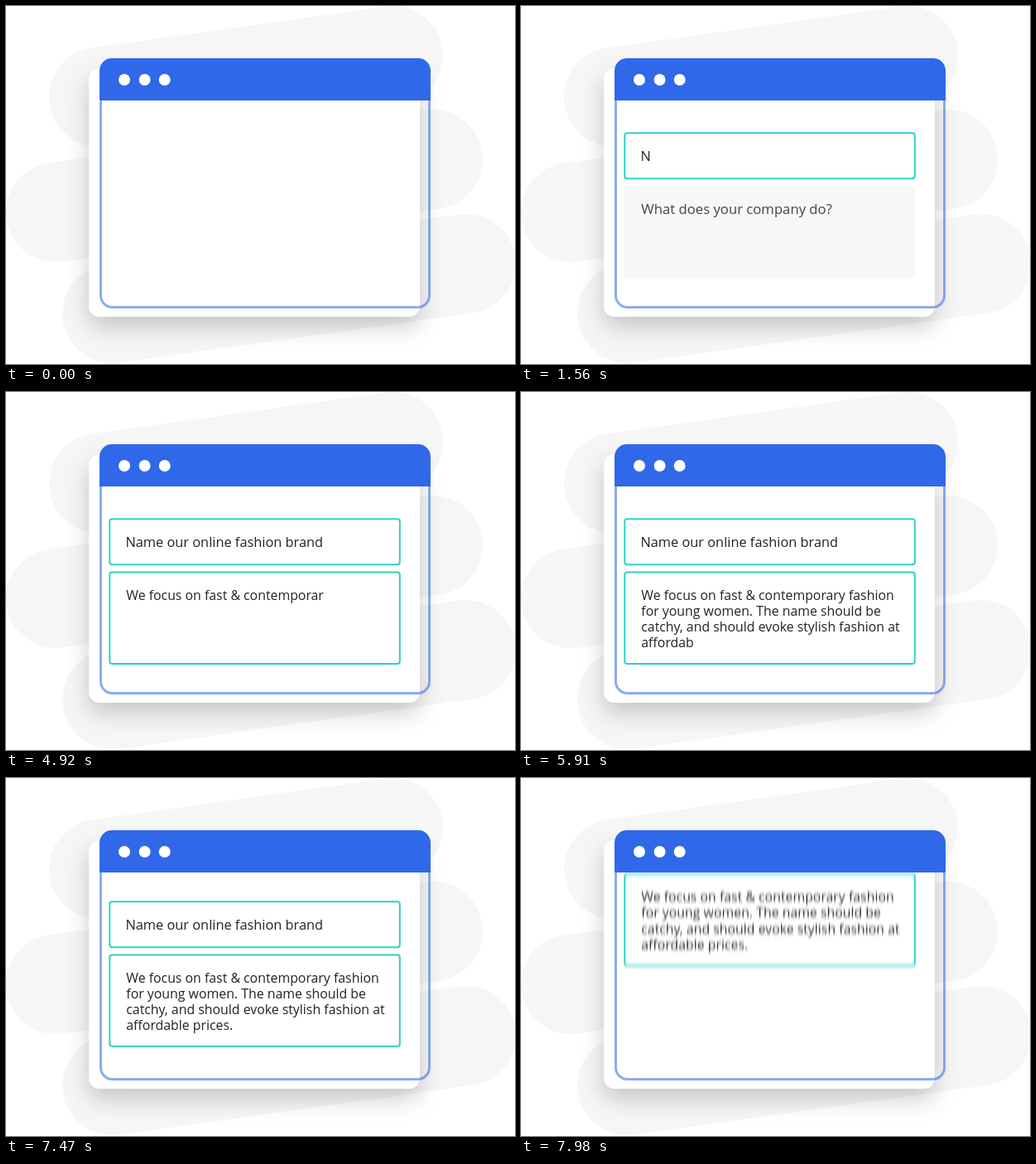
Write an HTML page that moves like this. It is 615x432 px and loops after 8 s.

```html
<!DOCTYPE html>
<html lang="en">
<head>
<meta charset="utf-8">
<title>Naming brief form</title>
<style>
  html, body { margin: 0; width: 100%; height: 100%; overflow: hidden; background: #fff; }
  svg { display: block; width: 615px; height: 432px; }
  text { font-family: "Open Sans", "Noto Sans", sans-serif; white-space: pre; }
  .blobs { stroke: #f6f6f6; stroke-width: 120; stroke-linecap: round; }
  .card { filter: drop-shadow(0 12px 14px rgba(0, 0, 0, .2)); }
  .fill { fill: #f7f7f7; }
  .edge { fill: #fff; stroke: #2fd0cb; stroke-width: 2; }
  .hint { fill: #444; }
  .typed { fill: #222; }
</style>
</head>
<body>
<svg viewBox="0 0 615 432" xmlns="http://www.w3.org/2000/svg">
  <defs>
    <clipPath id="view"><rect x="116" y="114" width="384" height="262"/></clipPath>
    <filter id="smear" filterUnits="userSpaceOnUse" x="100" y="-60" width="420" height="720"
            color-interpolation-filters="sRGB">
      <feGaussianBlur id="blur" stdDeviation="0 0"/>
    </filter>
  </defs>

  <g class="blobs">
    <path d="M112 110L468 60"/>
    <path d="M60 249L516 185"/>
    <path d="M128 371L556 311"/>
  </g>
  <rect class="card" x="100" y="75" width="400" height="300" rx="13" fill="#fff"/>

  <g clip-path="url(#view)">
    <g id="form">
      <rect class="fill" x="125" y="153" width="351.5" height="55" rx="2"/>
      <rect class="fill" x="125" y="217.5" width="351.5" height="110.5" rx="2"/>
      <g id="focus1"><rect class="edge" x="125.3" y="153.3" width="350.5" height="55" rx="3"/></g>
      <g id="focus2"><rect class="edge" x="125.3" y="217.6" width="350.5" height="110.3" rx="3"/></g>
      <text class="hint" id="hint1" x="143.7" y="187" font-size="16.5">Naming Brief</text>
      <text class="hint" id="hint2" x="145.3" y="250.7" font-size="16.7">What does your company do?</text>
      <g class="typed" id="typed"></g>
    </g>
  </g>

  <path d="M114.500 114V349.500a14 14 0 0 0 14 14H497.500a14 14 0 0 0 14-14V114"
        fill="none" stroke="#2f68e8" stroke-opacity=".55" stroke-width="3"/>
  <path d="M113 114V78a15 15 0 0 1 15-15H498a15 15 0 0 1 15 15V114Z" fill="#2f68e8"/>
  <g fill="#fff">
    <circle cx="143" cy="89" r="7"/>
    <circle cx="167.600" cy="89" r="7"/>
    <circle cx="191.700" cy="89" r="7"/>
  </g>
</svg>
<script>
const LOOP = 8000, STEP = 30;
const $ = id => document.getElementById(id);
const clamp = v => Math.min(1, Math.max(0, v));
const ramp = (t, a, b) => clamp((t - a) / (b - a));
const easeInOut = u => u < .5 ? 2 * u * u : 1 - 2 * (1 - u) ** 2;

const title = 'Name our online fashion brand';
const body = [
  'We focus on fast & contemporary fashion',
  'for young women. The name should be',
  'catchy, and should evoke stylish fashion at',
  'affordable prices.'
];
const bodyLength = body.reduce((n, line) => n + line.length + 1, 0) - 1;

// time, letters shown
const titleSteps = [[1559, 0], [1560, 1], [1710, 2], [1800, 3.9], [1950, 7.2], [2197, 14.5],
  [2350, 19.3], [2490, 23], [2580, 25], [2850, 28], [3030, 29]];

function addLine(x, y, size) {
  const el = document.createElementNS('http://www.w3.org/2000/svg', 'text');
  el.setAttribute('x', x);
  el.setAttribute('y', y);
  el.setAttribute('font-size', size);
  $('typed').append(el);
  return el;
}
const titleLine = addLine(144.4, 187, 16.35);
const bodyLines = body.map((_, i) => addLine(145.3, 250.7 + 19.25 * i, 15.85));

function interpolate(steps, t) {
  if (t < steps[0][0]) return 0;
  for (let i = 1; i < steps.length; i++) {
    const [a, from] = steps[i - 1], [b, to] = steps[i];
    if (t < b) return from + (to - from) * (t - a) / (b - a);
  }
  return steps[steps.length - 1][1];
}

// The form glides in from below, rests, then speeds off upwards.
function offset(t) {
  if (t < 1065) return 15 * ((1065 - t) / 315) ** 2.3;
  if (t > 7150) return -101.5 * ((t - 7150) / 830) ** 3.36;
  return 0;
}

function draw(t) {
  const form = $('form');
  const y = offset(t);
  const speed = Math.abs(offset(t + 1) - offset(t - 1)) / 2;
  form.setAttribute('transform', `translate(0 ${y.toFixed(3)})`);
  if (speed > .02) {
    $('blur').setAttribute('stdDeviation', `0 ${(speed * 4.9).toFixed(2)}`);
    form.setAttribute('filter', 'url(#smear)');
  } else {
    form.removeAttribute('filter');
  }

  $('focus1').setAttribute('opacity', ramp(t, 1065, 1380));
  $('hint1').setAttribute('opacity', 1 - ramp(t, 1065, 1380));
  $('focus2').setAttribute('opacity', ramp(t, 4080, 4400));
  $('hint2').setAttribute('opacity', 1 - ramp(t, 4080, 4350));

  titleLine.textContent = title.slice(0, Math.floor(interpolate(titleSteps, t)));
  let left = Math.floor(bodyLength * easeInOut(ramp(t, 4230, 6300)));
  body.forEach((line, i) => {
    bodyLines[i].textContent = line.slice(0, Math.max(0, left));
    left -= line.length + 1;
  });
}

const start = performance.now();
function tick() {
  const t = (performance.now() - start) % LOOP;
  draw(Math.floor(t / STEP) * STEP);
  requestAnimationFrame(tick);
}
tick();
</script>
</body>
</html>
```
